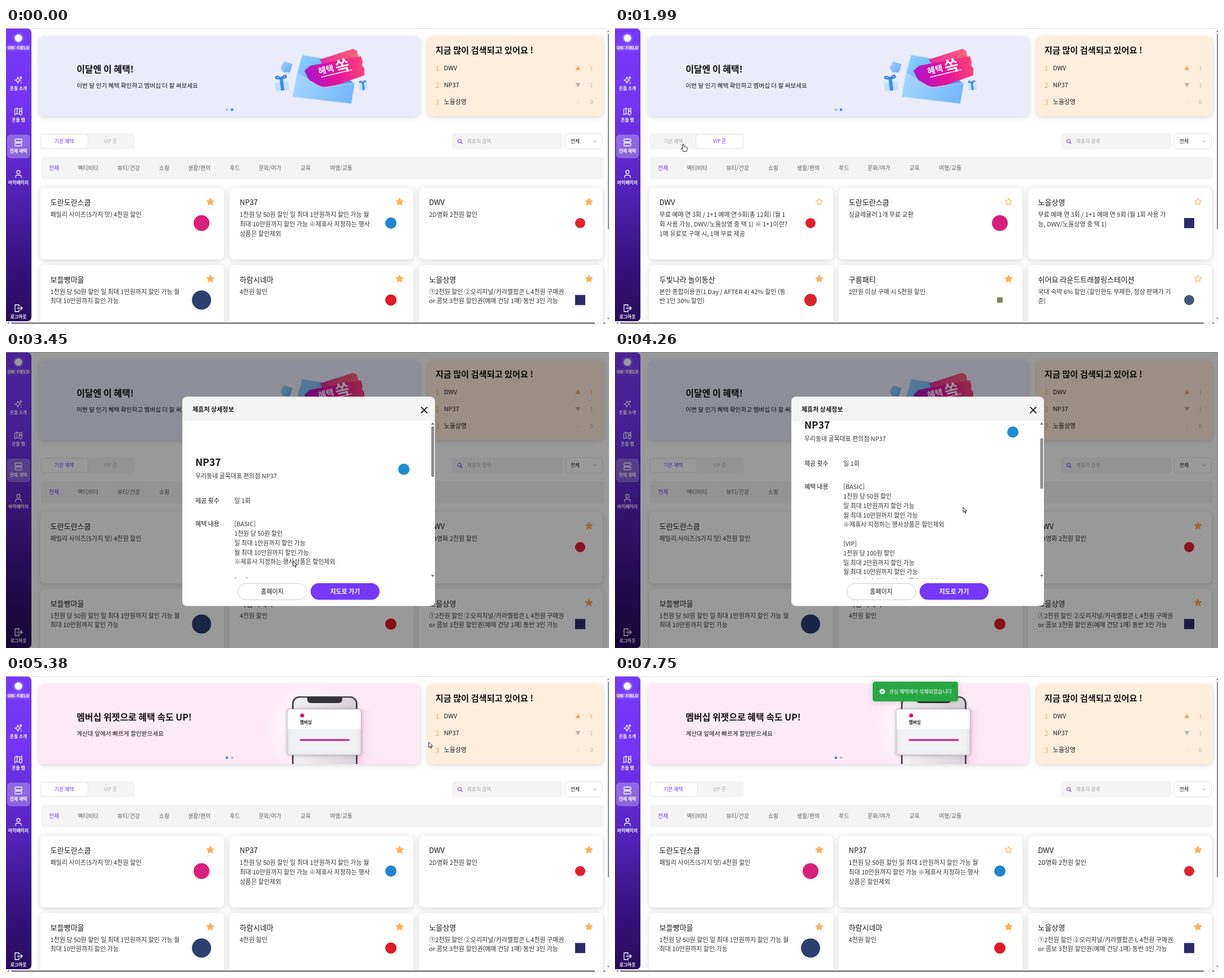
An HTML page with a canvas for the animation above (8090 ms loop, 1067 by 525 pixels).

```html
<!DOCTYPE html>
<html lang="ko">
<head>
<meta charset="utf-8">
<style>
html, body { margin: 0; width: 100%; height: 100%; overflow: hidden; background: #fff; }
canvas { display: block; }
</style>
</head>
<body>
<canvas id="stage" width="1067" height="525"></canvas>
<script>
const c = document.getElementById('stage').getContext('2d');
const W = 1067, H = 525, LOOP = 8090;
const FONT = '"Noto Sans CJK KR", "Noto Sans CJK JP", "Noto Sans CJK", sans-serif';
const PURPLE = '#7638fa', ORANGE = '#ffb057', GREY = '#a8a8a8', INK = '#1a1a1a';

const clamp = v => Math.max(0, Math.min(1, v));
const easeOut = v => 1 - (1 - v) ** 3;

// CSS "ease" timing curve
function ease(x) {
  let lo = 0, hi = 1;
  for (let i = 0; i < 20; i++) {
    const u = (lo + hi) / 2, v = 1 - u;
    if (.75 * v * v * u + .75 * v * u * u + u ** 3 < x) lo = u; else hi = u;
  }
  return .3 * (1 - lo) ** 2 * lo + 3 * (1 - lo) * lo * lo + lo ** 3;
}

// Smooth interpolation through [time, ...values] keys, resting where values repeat
function track(keys, t, k) {
  if (t <= keys[0][0]) return keys[0][k];
  const i = keys.findIndex(p => p[0] > t);
  if (i < 0) return keys[keys.length - 1][k];
  const slope = j => {
    const a = keys[j - 1], b = keys[j], d = keys[j + 1];
    if (!a || !d || (b[k] - a[k]) * (d[k] - b[k]) <= 0) return 0;
    return (d[k] - a[k]) / (d[0] - a[0]);
  };
  const a = keys[i - 1], b = keys[i], span = b[0] - a[0], u = (t - a[0]) / span;
  const s = u * u * (3 - 2 * u);
  return a[k] + (b[k] - a[k]) * s
    + span * (slope(i - 1) * u * (1 - u) ** 2 - slope(i) * u * u * (1 - u));
}

function text(s, x, y, size, color = INK, weight = 400, align = 'left') {
  c.font = `${weight} ${size}px ${FONT}`;
  c.textAlign = align;
  c.fillStyle = color;
  c.fillText(s, x, y + size * .38);
}

function box(x, y, w, h, r, fill, stroke) {
  c.beginPath();
  c.roundRect(x, y, w, h, r);
  if (fill) { c.fillStyle = fill; c.fill(); }
  if (stroke) { c.strokeStyle = stroke; c.lineWidth = 1; c.stroke(); }
}

function shadowBox(...args) {
  c.save();
  c.shadowColor = 'rgba(0,0,0,.16)';
  c.shadowBlur = 10;
  c.shadowOffsetY = 2;
  box(...args);
  c.restore();
}

function disc(x, y, r, fill) {
  c.beginPath();
  c.arc(x, y, r, 0, 7);
  c.fillStyle = fill;
  c.fill();
}

function poly(pts, fill) {
  c.beginPath();
  pts.forEach(([x, y]) => c.lineTo(x, y));
  c.closePath();
  c.fillStyle = fill;
  c.fill();
}

function line(d, x, y, color, width) {
  c.save();
  c.translate(x, y);
  c.strokeStyle = color;
  c.lineWidth = width;
  c.lineCap = c.lineJoin = 'round';
  c.stroke(new Path2D(d));
  c.restore();
}

function grad(x0, y0, x1, y1, ...stops) {
  const g = c.createLinearGradient(x0, y0, x1, y1);
  stops.forEach((s, i) => g.addColorStop(i / (stops.length - 1), s));
  return g;
}

function star(x, y, on) {
  c.beginPath();
  for (let i = 0; i < 10; i++) {
    const a = i * Math.PI / 5 - Math.PI / 2, r = i % 2 ? 3.1 : 6.3;
    c.lineTo(x + r * Math.cos(a), y + .5 + r * Math.sin(a));
  }
  c.closePath();
  c.lineJoin = 'round';
  c.lineWidth = on ? 1.6 : 1.1;
  c.strokeStyle = c.fillStyle = ORANGE;
  if (on) c.fill();
  c.stroke();
}

const MENU = [
  [92, '온들 소개', 'M-1-5Q-.3-.3 4 .5Q-.3 1.3-1 6Q-1.7 1.3-6 .5Q-1.7-.3-1-5ZM4-6v4M2-4h4M5 4v2'],
  [148, '온들 맵', 'M1 5L-2.500 4-6.500 6V-4L-2.500-6 2-4 6-6V-1M-2.500-6V4M2-4V0M4 6.500Q1 3.500 1.500 2A2.500 2.500 0 0 1 6.500 2Q7 3.500 4 6.500Z'],
  [203, '전체 혜택', 'M-5-6H5Q6-6 6-5V-2Q6-1 5-1H-5Q-6-1-6-2V-5Q-6-6-5-6ZM-5 1H5Q6 1 6 2V5Q6 6 5 6H-5Q-6 6-6 5V2Q-6 1-5 1Z'],
  [259, '마이페이지', 'M3-3.500A3 3 0 1 1-3-3.500A3 3 0 1 1 3-3.500M-5 6.500V5Q-5 2-2 2H2Q5 2 5 5V6.500'],
  [497, '로그아웃', 'M1-3V-6H-6V6H1V3M-2 0H7M4-3L7 0 4 3']
];

function sidebar(h) {
  box(0, 1, 45, h - 1, [0, 7, 7, 0], grad(0, 0, 0, 520, PURPLE, '#7435f5', '#5a25c4', '#3b1589', '#260c5c'));
  c.save();
  c.shadowColor = 'rgba(255,255,255,.8)';
  c.shadowBlur = 5;
  disc(22, 18, 6.5, '#fff');
  text('ON: FIELD', 22, 35, 7.9, '#fff', 700, 'center');
  c.restore();
  box(2, 189, 40.500, 42, 6, 'rgba(255,255,255,.28)');
  for (const [y, label, icon] of MENU) {
    line(icon, 22, y, '#fff', 1.3);
    text(label, 22, y + 15.500, 7.8, '#fff', 700, 'center');
  }
}

function gift(x, y, s) {
  c.save();
  c.translate(x, y);
  c.rotate(-.12);
  c.scale(s, s);
  box(-12, -7, 24, 20, 2, '#c3e0ff');
  box(-14, -9, 28, 7, 2, '#dceeff');
  box(-3, -9, 6, 22, 0, '#3a8cf0');
  line('M0-9Q-10-17-9-10Q-6-8 0-9Q10-17 9-10Q6-8 0-9', 0, 0, '#2f7fe8', 2.5);
  c.restore();
}

function benefitSlide(x) {
  c.save();
  c.translate(x, 0);
  shadowBox(59, 15, 673, 141, 8, '#eaecfc');
  text('이달엔 이 혜택!', 125, 73, 15.9, '#111', 700);
  text('이번 달 인기 혜택 확인하고 멤버십 더 잘 써보세요', 125, 102, 10.65, '#111', 500);
  poly([[486, 70], [492, 59], [507, 64], [502, 79], [490, 78]], grad(486, 59, 507, 79, '#a9d6ff', '#5ea8f5'));
  poly([[515, 82], [524, 48], [560, 54], [616, 98], [560, 112]], grad(520, 48, 600, 110, '#8ed0ff', '#4b9cf5'));
  poly([[555, 56], [614, 37], [621, 40], [627, 66], [575, 86]], grad(555, 50, 627, 60, '#e52a9c', '#ff6a72'));
  poly([[528, 76], [538, 67], [628, 50], [631, 60], [630, 66], [634, 72], [634, 84], [560, 110], [545, 109]],
    grad(528, 80, 634, 60, '#a915c8', '#e3149b', '#ff4376'));
  poly([[515, 80], [554, 103], [563, 105], [617, 97], [611, 134], [507, 122]], grad(510, 85, 610, 134, '#a5d7ff', '#73b6fa'));
  line('M515 80L554 103Q559 106 566 105L617 97', 0, 0, '#c6e6ff', 1);
  c.save();
  c.translate(553, 77);
  c.rotate(-.24);
  text('혜택', 0, 0, 15, '#fff', 700);
  text('쏙', 31, 0, 27, '#fff', 900);
  line('M3 11H58', 0, 0, '#fff', 1.5);
  c.restore();
  gift(488, 98, 1);
  gift(632, 102, .62);
  c.restore();
}

function widgetSlide(x) {
  c.save();
  c.translate(x, 0);
  shadowBox(59, 15, 673, 141, 8, '#feeaf7');
  c.beginPath();
  c.rect(59, 15, 673, 141);
  c.clip();
  const glow = c.createRadialGradient(535, 90, 20, 535, 90, 78);
  glow.addColorStop(0, '#fff');
  glow.addColorStop(1, 'rgba(255,255,255,0)');
  c.fillStyle = glow;
  c.fillRect(455, 15, 165, 141);
  c.fillStyle = grad(615, 0, 655, 0, 'rgba(240,170,215,.65)', 'rgba(254,234,247,0)');
  c.fillRect(615, 60, 40, 96);
  text('멤버십 위젯으로 혜택 속도 UP!', 125, 73, 15.9, '#111', 700);
  text('계산대 앞에서 빠르게 할인받으세요', 125, 102, 10.65, '#111', 500);
  box(506, 36, 116, 140, 13, '#4a4a50');
  box(509, 38.500, 110, 140, 11, grad(509, 0, 619, 0, '#f4f1f4', '#d9d3d9'));
  box(533, 37, 62, 11, [0, 0, 6, 6], '#34343a');
  c.save();
  c.shadowColor = 'rgba(80,40,70,.35)';
  c.shadowBlur = 6;
  box(498, 59, 130, 81, 4, '#f1f2f4', '#c9c5ca');
  c.restore();
  box(498.500, 59.500, 129, 34, [4, 4, 0, 0], '#fff');
  disc(524, 70, 3.500, '#e6007e');
  text('멤버십', 520, 82, 7.6, INK, 700);
  box(520, 112, 88, 3, 1, '#e5168a');
  c.restore();
}

function banner(t) {
  const p = ease(clamp((t - 4410) / 300)), shift = 689 * p;
  c.save();
  c.beginPath();
  c.rect(50, 0, 690, 175);
  c.clip();
  if (p < 1) benefitSlide(-shift);
  if (p > 0) widgetSlide(689 - shift);
  c.restore();
  const second = t < 4410;
  disc(391, 145, 2.3, second ? '#b9bbc6' : '#2b82e0');
  disc(400, 145, 2.3, second ? '#1f86f5' : '#c4bcc2');
}

function popular() {
  shadowBox(746, 15, 311, 141, 9, '#ffeedc');
  text('지금 많이 검색되고 있어요 !', 760, 39, 15.2, '#111', 700);
  ['DWV', 'NP37', '노을상영'].forEach((name, i) => {
    const y = 71 + i * 30, color = i ? '#b3b0ac' : '#f9a254';
    text(i + 1, 760, y, 12, '#f9a254', 500);
    text(name, 775, y, 10.9, INK, 500);
    text(i ? i - 1 ? '0' : '1' : '1', 1036, y, 9.5, color, 400, 'center');
    const d = i ? -1 : 1;
    if (i < 2) poly([[1007.500, y + 3.500 * d], [1012, y - 4 * d], [1016.500, y + 3.500 * d]], color);
    else text('-', 1012, y, 9.5, color, 400, 'center');
  });
}

function filters(vip) {
  box(61, 187, 167, 28, 5, '#f4f4f4');
  c.save();
  c.shadowColor = 'rgba(0,0,0,.1)';
  c.shadowBlur = 2;
  box(vip ? 144 : 62.500, 189.500, 82, 23.500, 4, '#fff');
  c.restore();
  text('기본 혜택', 103, 201, 8.8, vip ? GREY : PURPLE, 500, 'center');
  text('VIP 존', 185, 201, 8.9, vip ? PURPLE : '#b5b5b5', 500, 'center');
  box(789, 187, 195.500, 28, 5, '#f4f4f4');
  line('M2.500-.5A3 3 0 1 1-3.500-.5A3 3 0 1 1 2.500-.5M1.700 1.700L4 4', 803, 201, PURPLE, 1.1);
  text('제휴처 검색', 816, 201, 8.7, GREY);
  box(989.500, 187.500, 66, 27, 5, '#fff', '#e3e3e3');
  text('전체', 999, 201, 8.8, INK, 500);
  line('M-2.500-1.200L0 1.300 2.500-1.200', 1042, 201, '#999', 1);
  box(62, 229, 996, 39, 4, '#f4f4f4');
  const tabs = { 전체: 76, 액티비티: 127, '뷰티/건강': 197, 쇼핑: 271, '생활/편의': 322, 푸드: 396, '문화/여가': 447, 교육: 521, '여행/교통': 573 };
  for (const name in tabs) {
    const on = name === '전체';
    text(name, tabs[name], 248, 9.8, on ? PURPLE : '#5c5c5c', on ? 500 : 400);
  }
}

const dwv = [9, '#e5202e'], scoop = [14, '#d91f7c'], np = [10, '#2184d2'], hall = [-9, '#2d2b66'];
// title, lines, [logo radius (negative = square), color], starred
const BASIC = [
  ['도란도란스쿱', ['패밀리 사이즈(5가지 맛) 4천원 할인'], scoop, 1],
  ['NP37', ['1천원 당 50원 할인 일 최대 1만원까지 할인 가능 월', '최대 10만원까지 할인 가능 ※제휴사 지정하는 행사', '상품은 할인제외'], np, 1],
  ['DWV', ['2D영화 2천원 할인'], dwv, 1],
  ['보들빵마을', ['1천원 당 50원 할인 일 최대 1만원까지 할인 가능 월', '최대 10만원까지 할인 가능'], [17, '#2c3f73'], 1],
  ['하람시네마', ['4천원 할인'], [10, '#e3182b'], 1],
  ['노을상영', ['①2천원 할인 ②오리지널/카라멜팝콘 L 4천원 구매권', 'or 콤보 3천원 할인권(예매 건당 1매) 동반 3인 가능'], hall, 1]
];
const VIP = [
  ['DWV', ['무료 예매 연 3회 / 1+1 예매 연 9회(총 12회) (월 1', '회 사용 가능, DWV/노을상영 중 택 1) ※ 1+1이란?', '1매 유료로 구매 시, 1매 무료 제공'], dwv, 0],
  ['도란도란스쿱', ['싱글레귤러 1개 무료 교환'], scoop, 0],
  ['노을상영', ['무료 예매 연 3회 / 1+1 예매 연 9회 (월 1회 사용 가', '능, DWV/노을상영 중 택 1)'], hall, 0],
  ['두빛나라 놀이동산', ['본인 종합이용권(1 Day / AFTER 4) 42% 할인 (동', '반 1인 30% 할인)'], [11, '#d8232a'], 1],
  ['구름패티', ['2만원 이상 구매 시 5천원 할인'], [-5, '#7d8a5c'], 1],
  ['쉬어요 라운드트래블링스테이션', ['국내 숙박 6% 할인 (할인한도 무제한, 정상 판매가 기', '준)'], [9, '#3e5a78'], 0]
];

function cards(t, vip) {
  (vip ? VIP : BASIC).forEach(([title, lines, [r, color], on], i) => {
    const x = 60.500 + i % 3 * 335, y = i < 3 ? 283.500 : 420;
    shadowBox(x, y, 325.500, 127, 8, '#fff');
    text(title, x + 18, y + 26, 13, INK, 500);
    lines.forEach((s, n) => text(s, x + 18, y + 47.500 + n * 16.800, 11, '#333'));
    star(x + 301, y + 24.500, on && !(i === 1 && !vip && t >= 6720));
    if (r > 0) disc(x + 285.500, y + 62.500, r, color);
    else box(x + 285.500 + r, y + 62.500 + r, -2 * r, -2 * r, 0, color);
  });
}

function scrollbars() {
  c.fillStyle = '#f7f7f7';
  c.fillRect(0, 520, W, 5);
  c.fillRect(1064, 0, 3, H);
  box(9, 522, 1033, 3, 1.5, '#8c8c8c');
  box(1065, 10, 2, 347, 1, '#8c8c8c');
  poly([[2, 523.500], [5.500, 521.500], [5.500, 525]], '#777');
  poly([[1061, 523.500], [1057.500, 521.500], [1057.500, 525]], '#777');
  poly([[1064, 7], [1066, 4], [1067, 7]], '#777');
  poly([[1064, 514], [1066, 517], [1067, 514]], '#777');
}

const SCROLL = [[3980, 0], [4180, 45], [4260, 65], [4600, 448], [4780, 538]];
const TERMS = [
  [305, '[BASIC]', '1천원 당 50원 할인', '일 최대 1만원까지 할인 가능', '월 최대 10만원까지 할인 가능', '※제휴사 지정하는 행사상품은 할인제외', '',
    '[VIP]', '1천원 당 100원 할인', '일 최대 2만원까지 할인 가능', '월 최대 10만원까지 할인 가능', '※제휴사 지정하는 행사상품은 할인제외'],
  [570, '결제 시 직원에게 멤버십 카드 제시', '', '', '', '*꼭 확인하세요', '',
    '- 제휴사(NP37)에서 지정하는 행사상품(1+1, 2+1, 할인, 덤증정 등)은', 'N:멤버십 할인 제외', '',
    '- 일부매장(휴게소 등) 제외', '',
    '- 술, 담배, NP37에서 별도로 정하는 일부 서비스 항목(전화카드, 택배, 상', '품권, 주류공병, 쓰레기 봉투등에 해당하는 특별한 상품), 자체 할인행사 일', '부 항목 제외']
];

function modal(t) {
  const top = track(SCROLL, t, 1);
  c.fillStyle = 'rgba(0,0,0,.4)';
  c.fillRect(0, 0, W, H);
  box(312, 79.500, 447, 371, 8, '#fff');
  box(312, 79.500, 447, 42.500, [8, 8, 0, 0], '#f4f4f4');
  text('제휴처 상세정보', 330, 102, 11, INK, 700);
  line('M-5-5L5 5M5-5L-5 5', 740, 103, '#222', 1.8);
  c.save();
  c.beginPath();
  c.rect(312, 122, 438, 280);
  c.clip();
  c.translate(0, -top);
  text('NP37', 335, 195.500, 17.5, INK, 700);
  text('우리동네 골목대표 편의점 NP37', 335, 220, 10.9, '#333');
  disc(704, 208, 10, '#1b8fcf');
  text('제공 횟수', 335, 263.500, 10.9, INK, 500);
  text('일 1회', 404, 264, 10.9, '#333');
  text('혜택 내용', 335, 305, 10.9, INK, 500);
  text('이용 방법', 335, 570, 10.9, INK, 500);
  for (const [y, ...lines] of TERMS)
    lines.forEach((s, i) => text(s, 404, y + i * 16.800, 10.9, '#333'));
  c.restore();
  poly([[752, 129], [755, 124.500], [758, 129]], '#808080');
  poly([[752, 395], [755, 399.500], [758, 395]], '#808080');
  box(752.500, 131.500 + top / 3.11, 5, 90, 2.5, '#8a8a8a');
  box(410.500, 410.500, 122, 29, 14.5, '#fff', '#cfcfcf');
  text('홈페이지', 471, 424.500, 10.9, INK, 500, 'center');
  box(539, 410, 122, 29.500, 14.7, PURPLE);
  text('지도로 가기', 600, 424.500, 10.9, '#fff', 700, 'center');
}

function toast(t) {
  const p = easeOut(clamp((t - 6720) / 210));
  c.save();
  c.globalAlpha = p;
  c.translate(0, 6 * (p - 1));
  shadowBox(456, 10, 151, 35, 4, '#28a745');
  disc(473, 27.500, 4.8, '#fff');
  line('M-2 0L-.6 1.500 2.200-1.500', 473, 27.500, '#28a745', 1.2);
  text('관심 혜택에서 삭제되었습니다', 485, 27.500, 8.95, '#fff', 500);
  line('M-2.300-2.300L2.300 2.300M2.300-2.300L-2.300 2.300', 599.500, 17.500, '#1c6f31', 1);
  c.restore();
}

const POINTER = [
  [190, 1032, 516], [560, 640, 400], [930, 291, 251], [1000, 286, 249], [1320, 185, 201], [1650, 185, 201],
  [1960, 121, 206], [2400, 121, 206], [3100, 508, 371], [3450, 508, 371], [4150, 616, 275], [4500, 616, 275],
  [4600, 641, 249], [5020, 740, 101], [5120, 740, 101], [5380, 748, 117], [5900, 690, 350], [6020, 690, 350],
  [6420, 697, 306], [6740, 697, 306], [7470, 982, 496], [7750, 1036, 514]
];
const ARROW = new Path2D('M0 0V9.500L2.200 7.500 3.800 11 5.300 10.300 3.800 7H6.800Z');
const HAND = new Path2D('M-1.200 7V1Q0-.8 1.200 1V4.500Q2.500 3.800 3.200 5Q4.500 4.500 5.200 5.700Q6.800 5.500 6.800 7V9.500Q6.500 11 5.500 13H-.2Q-1.500 11-4 8.200Q-3.500 6-1.200 8Z');

function pointer(t) {
  if (t < 190 || t >= 7750) return;
  const hand = t > 1180 && t < 2480 || t > 4960 && t < 5120 || t > 6320 && t < 6800;
  const shape = hand ? HAND : ARROW;
  c.save();
  c.translate(track(POINTER, t, 1), track(POINTER, t, 2));
  c.lineJoin = 'round';
  c.lineWidth = 1;
  c.fillStyle = '#fff';
  c.strokeStyle = '#222';
  c.fill(shape);
  c.stroke(shape);
  c.restore();
}

function draw(now) {
  const t = now % LOOP;
  const open = t >= 3200 && t < 5120, vip = t >= 1490 && t < 2380;
  c.fillStyle = '#fff';
  c.fillRect(0, 0, W, H);
  cards(t, vip);
  filters(vip);
  banner(t);
  popular();
  c.fillStyle = '#dedede';
  c.fillRect(0, 0, W, 1);
  if (!open) scrollbars();
  sidebar(open ? 525 : 520);
  if (open) modal(t);
  if (t >= 6720) toast(t);
  pointer(t);
}

const start = performance.now();
(function tick() {
  draw(performance.now() - start);
  requestAnimationFrame(tick);
})();
</script>
</body>
</html>
```
